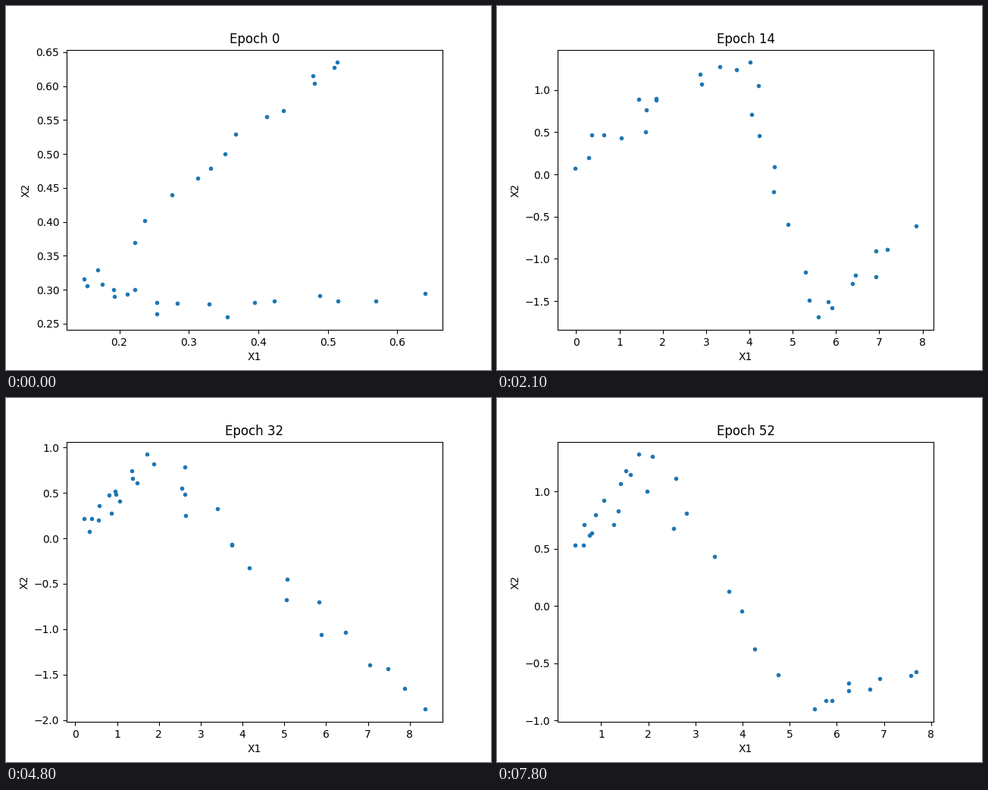
A matplotlib script for the animation above (8000 ms loop, 640x480 px).

```python
import numpy as np
import matplotlib.pyplot as plt
from matplotlib.animation import FuncAnimation

plt.rcParams["text.kerning_factor"] = 6

STEP_MS, TICK_MS, LOOP_MS = 300, 100, 8000
EPOCHS_PER_STEP = 2
N_POINTS = 32
TAIL_THINNING = 1.35
SCATTER = 0.025

# epoch: start, first bend, second bend and tail of the generated curve
CURVES = {
    0: [(.527, .635), (.1488, .313), (.267, .2596), (.6403, .297)],
    8: [(.2584, .457), (1.293, 1.1722), (2.517, .1796), (3.2886, .289)],
    14: [(-.034, .231), (3.85, 1.327), (5.57, -1.692), (7.859, -.605)],
    26: [(.25, .112), (1.73, .9005), (4.4, -.15), (6.947, -.931)],
    38: [(.155, .207), (1.37, .947), (4.77, -.75), (9.8, -2.833)],
    46: [(.287, .228), (1.63, 1.28), (4.3, -.5925), (5.833, -.519)],
    52: [(.438, .464), (1.8, 1.323), (5.0, -.902), (7.69, -.6225)],
}
KEY_EPOCHS = list(CURVES)
SHAPES = np.array(list(CURVES.values()))


def curve_at(epoch):
    """Blend the two neighbouring curve shapes."""
    position = np.interp(epoch, KEY_EPOCHS, range(len(KEY_EPOCHS)))
    left = min(int(position), len(KEY_EPOCHS) - 2)
    mix = position - left
    return (1 - mix) * SHAPES[left] + mix * SHAPES[left + 1]


def samples(epoch):
    """Scatter samples around the curve, filling exactly its extent."""
    curve = curve_at(epoch)
    low, extent = curve.min(axis=0), np.ptp(curve, axis=0)
    along = 3 * np.linspace(0, 1, N_POINTS) ** TAIL_THINNING
    points = np.column_stack([np.interp(along, range(4), axis) for axis in curve.T])
    noise = np.random.default_rng(epoch).normal(0, SCATTER, points.shape)
    points += noise * extent
    return low + (points - points.min(axis=0)) / np.ptp(points, axis=0) * extent


fig, ax = plt.subplots(figsize=(6.4, 4.8), dpi=100)
dots, = ax.plot([], [], ".")
ax.set_xlabel("X1")
ax.set_ylabel("X2")
title = ax.set_title("")


def update(tick):
    epoch = tick * TICK_MS // STEP_MS * EPOCHS_PER_STEP
    dots.set_data(*samples(epoch).T)
    ax.relim()
    ax.autoscale_view()
    title.set_text(f"Epoch {epoch}")
    return dots, title


anim = FuncAnimation(fig, update, frames=LOOP_MS // TICK_MS, interval=TICK_MS,
                     repeat=True, repeat_delay=0, blit=False)
plt.show()
```
